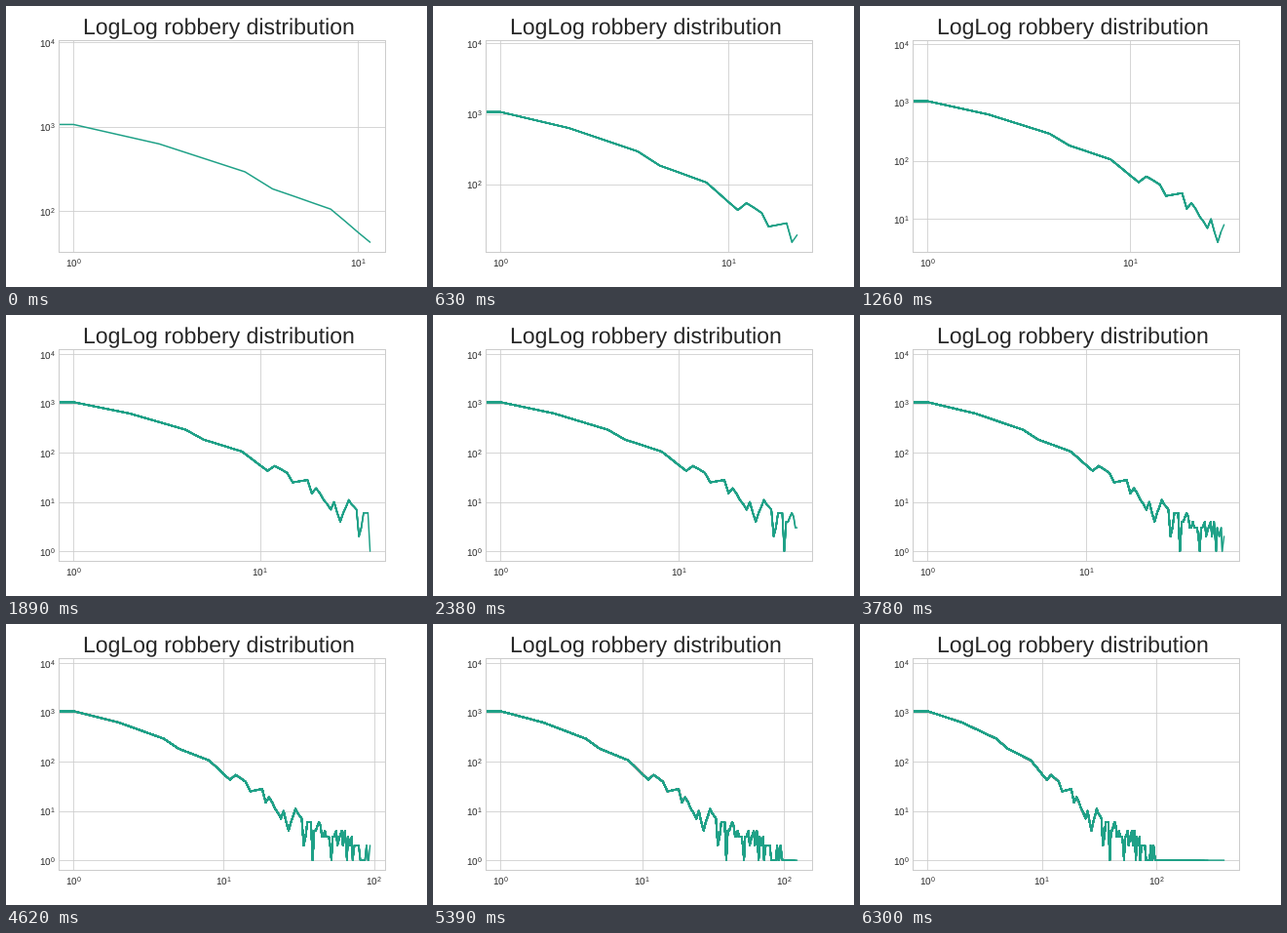
Animation of 432x288 px, one loop 7070 ms. Source, as a matplotlib script:

```python
import matplotlib.pyplot as plt
import numpy as np
from matplotlib.animation import FuncAnimation

plt.style.use("seaborn-v0_8-whitegrid")
plt.rcParams.update({"font.family": "Liberation Sans", "font.size": 10,
                     "text.hinting": "none"})

TEAL = "#1fa187"
FIRST = 12        # points drawn at the start
STEPS = 91        # one more point per step, then a pause
FRAMES = 101
MAX_COUNT = 8250  # count at size zero, off the left edge of the log axis

# Group sizes run without gaps at first, then grow ever sparser.
SIZE_KEYS = {1: 1, 35: 35, 38: 39, 53: 54, 77: 94, 88: 123,
             95: 180, 100: 280, 101: 388}
# Turning points of the count curve, joined by straight log-log lines.
COUNT_KEYS = {1: 1065, 2: 627, 4: 293, 5: 184, 8: 106, 11: 43, 12: 54,
              14: 39, 15: 25, 18: 28, 19: 15, 20: 19, 24: 7, 25: 10, 27: 4,
              30: 11, 33: 7, 34: 2, 36: 6, 38: 6, 39: 1}


def through(keys, x):
    """Straight lines through the key points."""
    return np.interp(x, list(keys), list(keys.values()))


def make_data():
    sizes = np.round(through(SIZE_KEYS, np.arange(1, FIRST + STEPS - 1)))
    log_keys = {np.log(s): np.log(c) for s, c in COUNT_KEYS.items()}
    counts = np.round(np.exp(through(log_keys, np.log(sizes))))
    # Beyond the keys only a few groups remain, fading to single ones.
    rare = sizes > max(COUNT_KEYS)
    spread = 1.8 * np.exp(-(sizes[rare] / 85) ** 4)
    counts[rare] = 1 + np.random.default_rng(4).poisson(spread)
    # Level run-in from the left edge.
    return np.r_[0.01, sizes], np.r_[counts[0], counts]


def padded(low, high):
    """Log limits with a 5 % margin on both sides."""
    pad = (high / low) ** 0.05
    return low / pad, high * pad


xs, ys = make_data()
fig, ax = plt.subplots(figsize=(6, 4), dpi=72)
fig.subplots_adjust(left=0.125, right=0.9, bottom=0.125, top=0.88)
ax.set_xscale("log")
ax.set_yscale("log")
ax.tick_params(axis="x", pad=5)
fig.text(218 / 432, 1 - 29 / 288, "LogLog robbery distribution",
         size=23, ha="center", va="baseline")

# Each step lays a longer curve over the earlier ones, thickening the edge.
curves = [ax.plot(xs[:FIRST + k], ys[:FIRST + k], color=TEAL, lw=1.5)[0]
          for k in range(STEPS)]


def draw(frame):
    step = min(frame, STEPS - 1)
    for k, curve in enumerate(curves):
        curve.set_visible(k <= step)
    shown = FIRST + step
    ax.set_xlim(padded(1, xs[shown - 1]))
    ax.set_ylim(padded(ys[:shown].min(), MAX_COUNT))
    return curves


anim = FuncAnimation(fig, draw, frames=FRAMES, interval=70, repeat=True,
                     repeat_delay=0, init_func=lambda: draw(0))
plt.show()
```
